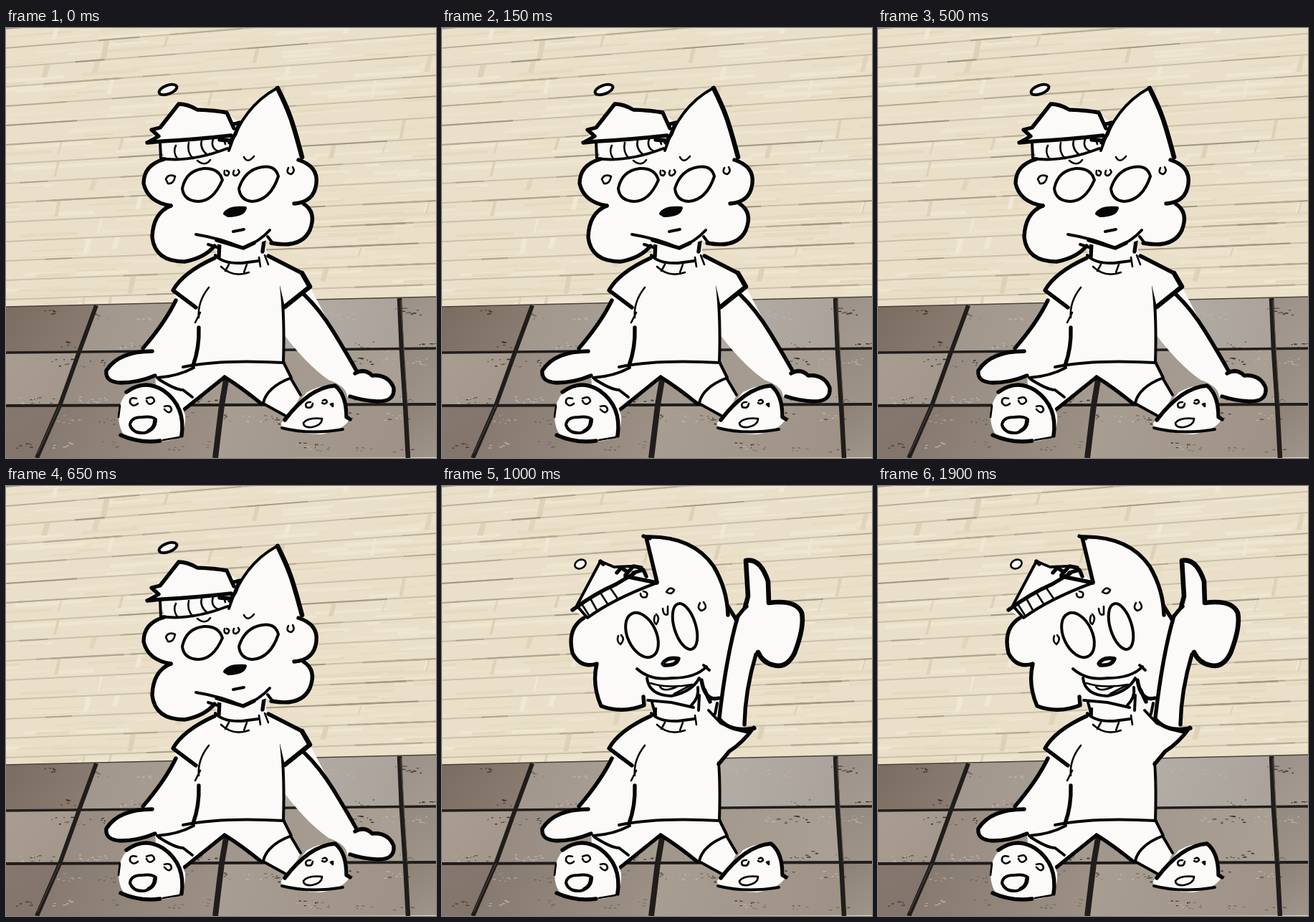
An HTML page with a canvas that plays this animation: 600x600 px, repeating every 2.5 s.

```html
<!DOCTYPE html>
<html lang="en">
<head>
<meta charset="utf-8">
<title>Look around, thumbs up</title>
<style>
  html, body { margin: 0; width: 100%; height: 100%; overflow: hidden; background: #eadfc6; }
  canvas, svg.stage { position: absolute; left: 0; top: 0; width: 100%; height: 100%; }
  .stage { fill: none; stroke: #050505; stroke-width: 4; stroke-linecap: round; stroke-linejoin: round; }
  .skin { fill: #fbfaf8; stroke: none; }
  .thin { stroke-width: 2.6; }
  .bold { stroke-width: 5.4; }
  .heavy { stroke-width: 6.6; }
  .ink { fill: #050505; }
  .pose { opacity: 0; }
</style>
</head>
<body>
<canvas id="room" width="600" height="600"></canvas>
<svg class="stage" viewBox="0 0 600 600">
  <!-- arm resting on the floor -->
  <g class="pose" data-pose="front left right">
    <path class="skin" d="M384 360L424 361L488 482Q535 480 542 506Q538 524 515 521L476 515Q476 500 450 491Q420 470 388 428Z"/>
    <path class="bold" d="M416 372Q438 393 457 424T490 480"/>
    <path class="bold" d="M487 482Q500 474 511 485Q533 483 541 502Q543 522 517 521Q498 520 480 514"/>
  </g>

  <!-- body -->
  <g>
    <path class="skin" d="M296 292L361 292L364 318L390 330L389 388L388 466L398 488L411 512L395 546L358 523L305 489L247 534L209 500L208 484Q190 496 160 495Q136 493 141 478Q155 454 192 449L238 379L234 366Q252 338 292 319Z"/>
    <path class="bold" d="M298 298L297 319M360 297L358 312"/>
    <path d="M292 317Q302 329 329 328L352 325"/>
    <path class="thin" d="M300 333Q317 349 339 341M311 330L306 339M336 330L332 341M353 320L355 333M361 317L366 330"/>
    <path class="bold" d="M291 321Q247 341 233 366L265 390"/>
    <path class="thin" d="M283 362Q267 382 269 404M271 397L264 411"/>
    <path class="bold" d="M269 418Q270 446 261 471"/>
    <path d="M247 473Q300 462 388 467M384 360Q389 406 387 466"/>
    <path class="bold" d="M237 380Q222 411 191 447M204 451Q157 451 140 478Q138 494 160 495Q184 495 208 485"/>
    <path class="bold" d="M305 487L249 532M305 487Q329 502 356 524"/>
    <path d="M262 474Q240 486 211 488M388 468L398 488Q364 501 359 523M398 490L411 512M359 524L397 545M213 490Q236 505 247 505L260 515"/>
  </g>

  <!-- sleeve of the resting arm -->
  <g class="pose" data-pose="front left right">
    <path class="skin" d="M364 318L413 342L424 361L389 389L380 350Z"/>
    <path d="M366 318L413 342" class="bold"/>
    <path d="M413 342L424 361L389 389" class="heavy"/>
  </g>

  <!-- feet -->
  <g>
    <path class="skin" d="M157 540Q160 498 200 497Q239 503 250 540Q252 566 234 574Q200 582 170 573Q157 563 157 540Z"/>
    <path class="bold" d="M168 508Q194 489 220 506Q251 528 245 569M160 568Q187 580 215 576"/>
    <path class="thin" d="M159 527L157 543M219 575L242 571"/>
    <path class="thin" d="M182 517Q172 514 173 523Q178 530 184 524M196 517Q206 512 207 521Q200 529 196 520M221 528Q230 525 231 533Q228 540 221 532"/>
    <path d="M190 543Q174 543 173 554Q177 566 193 565Q209 561 209 546Q203 541 190 543M207 548Q207 558 198 562"/>
    <path class="skin" d="M384 551L420 508Q453 490 470 511Q479 526 478 548Q470 561 440 567Q409 566 385 559Z"/>
    <path class="bold" d="M389 547Q423 502 459 499Q475 511 475 543L480 546"/>
    <path d="M385 558Q423 568 470 560"/>
    <path class="thin" d="M415 551Q421 543 441 545Q441 554 427 557Q415 558 415 551M425 522Q416 522 419 529Q427 532 428 524M442 520Q447 517 448 522Q445 526 441 523M453 525L456 524L456 528Z"/>
  </g>

  <!-- head facing the viewer -->
  <g class="pose" data-pose="front">
    <path class="skin" d="M313 168Q334 109 380 84L413 182Q441 193 432 226Q427 240 415 247Q432 256 425 282Q414 306 370 302L364 296L330 308L292 301Q285 323 249 327Q207 325 204 297Q205 261 230 248Q195 244 192 218Q193 190 221 181L216 165L197 159L215 137L241 105L306 117L326 133L318 152Z"/>
    <path d="M311 171Q330 110 378 84"/>
    <path class="heavy" d="M379 84Q391 108 397 125T413 180"/>
    <path class="bold" d="M408 184Q436 193 433 217Q430 243 402 245M415 245Q434 257 424 282Q412 308 370 300"/>
    <path class="bold" d="M221 183Q192 191 192 217Q198 243 230 248"/>
    <path class="bold" d="M230 248Q205 258 204 292Q208 326 249 326Q277 321 291 304"/>
    <path d="M265 288Q302 294 330 307Q354 298 368 282M282 302L298 307M365 291L372 300"/>
    <path class="bold" d="M294 296L314 302L331 307L346 300"/>
    <path d="M246 224Q251 199 276 196Q297 195 302 212Q289 242 268 242Q248 241 246 224M325 224Q333 198 357 194Q376 191 380 207Q369 240 344 242Q327 241 325 224"/>
    <path class="ink" d="M305 259Q311 249 334 251Q332 262 310 262Z"/>
    <path d="M317 284L332 281"/>
    <path class="thin" d="M223 211Q226 203 236 207Q234 218 226 217ZM305 199Q303 206 309 206Q314 201 308 199M318 199Q315 206 321 206Q328 202 324 198M332 180Q337 190 346 179M394 195Q390 203 398 204Q404 200 400 194M267 185Q278 194 285 184"/>
    <ellipse class="skin" cx="226" cy="86" rx="12" ry="6" transform="rotate(-20 226 86)"/>
    <ellipse cx="226" cy="86" rx="13" ry="6" transform="rotate(-20 226 86)"/>
    <path class="bold" d="M241 106Q253 106 267 114Q293 115 308 118L318 140M241 106L215 139L203 142L213 151L199 159"/>
    <path class="bold" d="M197 160L218 158Q260 156 314 150"/>
    <path d="M215 160L216 182Q257 188 309 168"/>
    <path class="thin" d="M237 164Q232 173 240 184M255 160Q252 173 261 182M273 157Q270 168 281 177M289 155Q285 167 296 172M303 153L306 162"/>
    <path class="bold" d="M318 134L326 132L320 148L312 160M298 156L313 157"/>
  </g>

  <!-- head in profile, mirrored for the other side -->
  <defs>
    <g id="profile">
      <path class="skin" d="M296 144Q344 104 393 84L384 164Q405 179 407 200L402 215Q417 238 404 262Q411 285 404 303L369 309L361 314L297 314L298 305Q258 302 247 287L237 267Q238 248 252 240Q244 196 271 166L283 155L257 160L254 153L263 139Q291 113 329 108Z"/>
      <path d="M296 144Q339 106 391 84"/>
      <path class="heavy" d="M391 85Q379 119 384 165"/>
      <path class="bold" d="M386 84L394 86"/>
      <path d="M329 109Q286 111 259 141L254 157L281 151L318 122M263 139Q289 129 318 121"/>
      <path d="M268 138L270 153M281 133L285 148"/>
      <path class="heavy" d="M260 141L263 146L257 156"/>
      <path class="thin" d="M272 164Q246 196 251 236"/>
      <ellipse class="bold" cx="246" cy="257" rx="8" ry="13" transform="rotate(20 246 257)"/>
      <path class="bold" d="M237 266L247 287L253 295Q284 304 319 304"/>
      <path d="M253 295L280 283M320 300L323 307"/>
      <path class="thin" d="M364 164Q383 171 391 187"/>
      <path class="heavy" d="M388 185Q406 216 391 242Q382 252 370 248Q389 257 384 281Q378 302 364 307L326 303"/>
      <path class="bold" d="M387 176Q404 178 407 201"/>
      <path d="M403 213Q417 239 404 260L399 264Q411 280 404 300L381 306M391 181L400 202"/>
      <ellipse cx="290" cy="207" rx="12" ry="29" transform="rotate(7 290 207)" class="thin"/>
      <path class="thin" d="M316 179Q313 186 319 185L320 181"/>
      <circle class="ink" cx="319" cy="217" r="3"/>
      <path class="skin" d="M312 87Q326 80 338 88Q326 94 312 87Z"/>
      <path d="M312 87Q318 82 327 82M314 90Q327 94 338 88L330 84"/>
    </g>
  </defs>
  <use class="pose" data-pose="left" href="#profile"/>
  <use class="pose" data-pose="right" href="#profile" transform="translate(643) scale(-1 1)"/>

  <!-- cheering: raised arm and head -->
  <g class="pose" data-pose="cheer">
    <path class="skin" d="M284 70Q348 67 379 111Q397 143 401 180L409 185L425 169L422 104Q438 95 453 122L457 163L493 165Q507 171 501 204Q493 251 470 252Q447 249 438 235Q423 285 422 335L436 339L400 372L386 388L352 313L296 309L281 298L280 307Q247 318 223 308Q209 284 217 248Q190 254 181 228Q177 199 199 184L182 172L221 104L244 112L276 112L299 134Z"/>
    <path class="bold" d="M284 71Q349 69 379 112Q398 144 399 180M285 72L300 134"/>
    <path class="bold" d="M281 70L290 73M399 168L409 184"/>
    <path class="heavy" d="M423 169L427 154L424 104Q444 100 455 133L456 163Q494 158 502 177Q506 197 492 233Q481 255 463 250Q448 247 441 232"/>
    <path class="bold" d="M413 181Q397 236 387 323M425 168Q419 173 410 186M438 235Q423 285 422 333"/>
    <path class="bold" d="M388 326Q403 344 436 338M435 337Q419 359 401 370L386 388"/>
    <path d="M372 313L389 331L407 339L428 344M384 303L381 318"/>
    <path class="bold" d="M198 184Q174 199 182 233Q193 255 216 248Q209 277 222 307Q251 318 282 306L281 294"/>
    <path d="M287 299L320 302L351 309M293 302L298 320M357 281Q359 295 348 306M359 292L358 313"/>
    <path class="bold" d="M362 271Q367 301 386 296M366 284L374 301"/>
    <path class="bold" d="M182 173Q213 150 243 137L268 122"/>
    <path d="M188 167L221 105L240 113L264 112M189 168L203 184Q238 158 300 135"/>
    <path class="thin" d="M194 163L206 182M207 157L217 175M221 149L232 166M234 141L245 157"/>
    <path class="bold" d="M221 105L225 109M244 121L250 114L259 120M256 124L267 112L278 114M267 121L281 117L285 126M256 126L300 135"/>
    <ellipse class="skin" cx="193" cy="109" rx="8" ry="6" transform="rotate(-25 193 109)"/>
    <ellipse cx="193" cy="109" rx="8" ry="6" transform="rotate(-25 193 109)" class="thin"/>
    <ellipse cx="279" cy="208" rx="20" ry="33" transform="rotate(-25 279 208)"/>
    <ellipse cx="339" cy="196" rx="15" ry="33" transform="rotate(-17 339 196)"/>
    <path class="bold" d="M308 248Q314 238 330 241Q327 251 310 250Z"/>
    <path d="M272 255Q291 272 321 268Q354 268 369 252M365 250L373 257"/>
    <path d="M286 268Q289 292 320 293Q349 287 359 268"/>
    <path class="thin" d="M291 275Q314 283 349 277M304 280Q310 289 330 279M324 290L347 278"/>
    <path class="thin" d="M246 209Q243 217 249 221Q256 214 250 208M277 150Q277 157 285 155Q289 148 281 147M313 148Q318 139 324 145Q321 153 313 148M297 181Q294 190 299 193Q305 184 299 179M308 171Q309 182 315 179L315 168M360 163Q355 171 362 174Q372 171 365 162"/>
  </g>
</svg>
<script>
const ctx = document.getElementById('room').getContext('2d');
let seed = 41;
const rnd = (lo = 0, hi = 1) => {
  seed = (seed * 1664525 + 1013904223) % 4294967296;
  return lo + (hi - lo) * seed / 4294967296;
};
const pick = list => list[Math.floor(rnd(0, list.length))];

function poly(points, fill) {
  ctx.beginPath();
  points.forEach(([x, y]) => ctx.lineTo(x, y));
  ctx.closePath();
  ctx.fillStyle = fill;
  ctx.fill();
}

function line(points, color, width) {
  ctx.beginPath();
  points.forEach(([x, y]) => ctx.lineTo(x, y));
  ctx.strokeStyle = color;
  ctx.lineWidth = width;
  ctx.stroke();
}

// Planks flatten towards the floor.
const plankY = (y0, x) => y0 - x * (0.086 - 0.052 * y0 / 390);

function drawWall() {
  ctx.fillStyle = '#eae0c9';
  ctx.fillRect(0, 0, 600, 400);
  for (let y0 = 1; y0 < 430; y0 += 27) {
    for (let i = 0; i < 22; i++) {
      const x = rnd(-30, 600), dy = rnd(3, 24), len = rnd(25, 110);
      line([[x, plankY(y0 + dy, x)], [x + len, plankY(y0 + dy, x + len)]],
           pick(['#efe6d2', '#e5dac0', '#e7dcc4', '#ede3cd']), rnd(1.5, 5));
    }
    for (let i = 0; i < 3; i++) {
      const x = rnd(0, 590), y = plankY(y0, x), w = rnd(2, 8), h = rnd(15, 27);
      poly([[x + 5, y], [x + w + 5, y], [x + w, y + h], [x, y + h]],
           pick(['#e0d5bb', '#f0e8d5', '#ddd1b7']));
    }
    line([[0, plankY(y0, 0)], [600, plankY(y0, 600)]], '#cbc0a8', 2);
    for (let i = 0; i < 4; i++) {
      const x = rnd(-40, 560), len = rnd(35, 130);
      line([[x, plankY(y0, x)], [x + len, plankY(y0, x + len)]],
           pick(['#a39984', '#b0a58e', '#b8ac94']), rnd(1.5, 2.4));
    }
  }
}

function drawTile(points, from, to) {
  const [[x0, y0], , [x1, y1]] = points;
  const shade = ctx.createLinearGradient(x0, y0, x1, y1);
  shade.addColorStop(0, from);
  shade.addColorStop(1, to);
  poly(points, shade);
}

function drawFloor() {
  const rows = [
    { y: [389, 453], x: [0, 125, 330, 548, 600], next: [0, 102, 314, 552, 600],
      tones: ['#7b6c61', '#8a7c70', '#a2978c', '#aaa198', '#b6b0aa', '#aaa29a', '#9a9087', '#a59b91'] },
    { y: [453, 527], x: [0, 102, 314, 552, 600], next: [0, 75, 297, 557, 600],
      tones: ['#a99d91', '#a3978b', '#988c82', '#a59a8e', '#a1968b', '#aaa094', '#94897e', '#a0958a'] },
    { y: [527, 601], x: [0, 75, 297, 557, 600], next: [0, 43, 290, 561, 600],
      tones: ['#85776d', '#83756b', '#877a70', '#9d9085', '#a99e92', '#9e9186', '#8d8176', '#a0958a'] }
  ];
  const tilt = (y, x) => y - x * (y < 400 ? 14 : y < 500 ? 6 : 2) / 600;
  for (const { y: [top, bottom], x, next, tones } of rows) {
    for (let i = 0; i < 4; i++) {
      drawTile([[x[i], tilt(top, x[i])], [x[i + 1], tilt(top, x[i + 1])],
                [next[i + 1], tilt(bottom, next[i + 1])], [next[i], tilt(bottom, next[i])]],
               tones[2 * i], tones[2 * i + 1]);
    }
  }
  for (let i = 0; i < 70; i++) {
    const cx = rnd(0, 600), cy = pick([395, 438, 462, 512, 540, 580]) + rnd(0, 10);
    const color = pick(['#3b332e', '#5d5149', '#74695f', '#bdb2a7']);
    for (let k = 0; k < 6; k++) {
      ctx.fillStyle = color;
      ctx.fillRect(cx + rnd(-14, 14), cy + rnd(-5, 5), rnd(1, 5), rnd(0.8, 1.8));
    }
  }
  const grout = '#201d1c';
  line([[0, 389], [600, 375]], '#4b4239', 1.5);
  line([[0, 453], [600, 447]], grout, 3.5);
  line([[0, 527], [600, 525]], grout, 4);
  line([[126, 387], [102, 452], [75, 527], [43, 600]], grout, 6);
  line([[330, 382], [314, 450], [301, 526], [292, 600]], grout, 8);
  line([[549, 377], [552, 450], [557, 525], [561, 600]], grout, 6.5);
  line([[44, 594], [75, 527]], '#50473f', 1);
  line([[551, 380], [560, 525]], '#5b5148', 1);
}

drawWall();
drawFloor();

const LOOP = 2500;
const steps = [[0, 'front'], [250, 'left'], [500, 'front'], [750, 'right'], [1000, 'cheer']];
for (const part of document.querySelectorAll('.pose')) {
  const poses = part.dataset.pose.split(' ');
  const frames = steps.map(([time, pose]) => (
    { offset: time / LOOP, opacity: poses.includes(pose) ? 1 : 0, easing: 'step-end' }));
  frames.push({ ...frames[frames.length - 1], offset: 1 });
  part.animate(frames, { duration: LOOP, iterations: Infinity });
}
</script>
</body>
</html>
```
